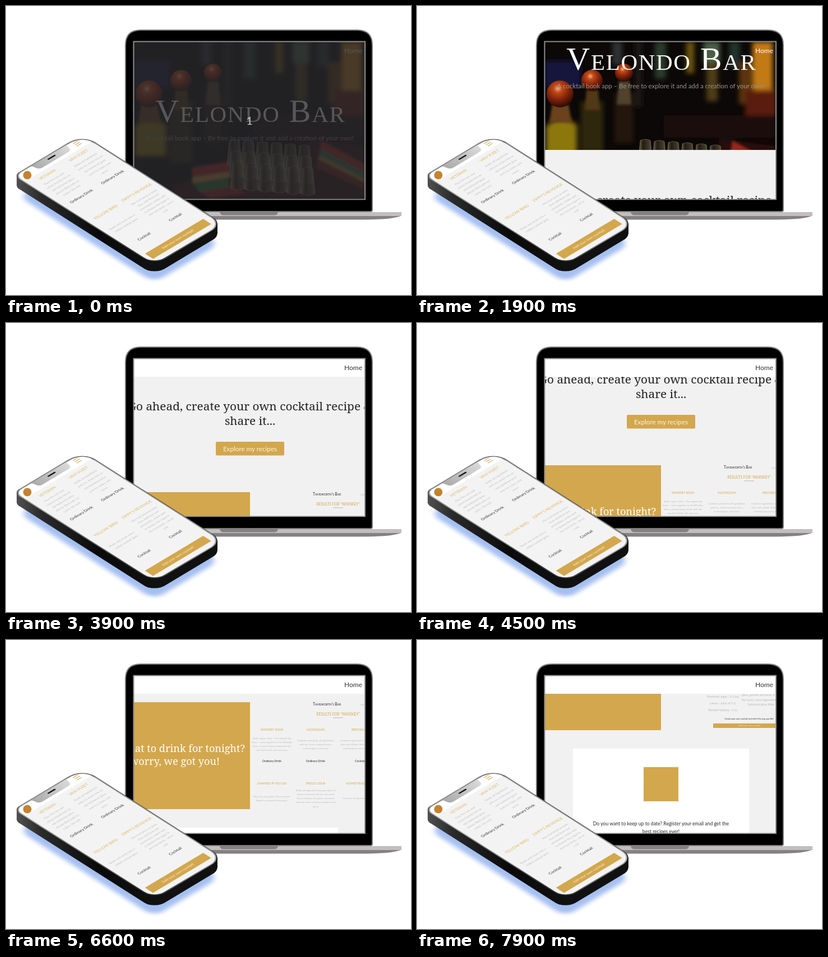
An HTML page that plays this animation: 722 px wide and 516 px high, repeating every 8 s.

```html
<!DOCTYPE html>
<html lang="en">
<head>
<meta charset="utf-8">
<title>Cocktail app mockup</title>
<style>
  html, body { margin: 0; width: 100%; height: 100%; overflow: hidden; background: #fff; }
  svg { display: block; }
  text { font-family: Lato, "Open Sans", sans-serif; text-anchor: middle; }
  .serif { font-family: "Noto Serif", serif; font-weight: 500; }
  .title { font: 58px "Liberation Serif", serif; font-variant: small-caps; letter-spacing: 1.7px; }
  .caps { font-variant: small-caps; }
  .left { text-anchor: start; }
  .right { text-anchor: end; }
</style>
</head>
<body>
<svg width="722" height="516" viewBox="0 0 722 516">
  <defs>
    <filter id="soft" x="-20%" y="-20%" width="140%" height="140%"><feGaussianBlur stdDeviation="4"/></filter>
    <filter id="blur" x="-20%" y="-20%" width="140%" height="140%"><feGaussianBlur stdDeviation="2"/></filter>
    <radialGradient id="ball" cx=".42" cy=".3" r=".75">
      <stop offset="0" stop-color="#f0b08a"/><stop offset=".2" stop-color="#c24a18"/>
      <stop offset=".55" stop-color="#82230a"/><stop offset="1" stop-color="#1c0804"/>
    </radialGradient>
    <linearGradient id="glass" x1="0" x2="1">
      <stop offset="0" stop-color="#a89c7c" stop-opacity=".7"/><stop offset=".35" stop-color="#2b2215" stop-opacity=".75"/>
      <stop offset=".7" stop-color="#5d5138" stop-opacity=".6"/><stop offset="1" stop-color="#978b6c" stop-opacity=".65"/>
    </linearGradient>
    <linearGradient id="frame" x1="0" x2="1" y1="1" y2="0">
      <stop offset="0" stop-color="#333"/><stop offset=".4" stop-color="#999"/><stop offset="1" stop-color="#8a8a8a"/>
    </linearGradient>
    <linearGradient id="side" x1="0" x2="0" y1="0" y2="1">
      <stop offset="0" stop-color="#555"/><stop offset=".2" stop-color="#2a2a2a"/>
      <stop offset=".6" stop-color="#0a0a0a"/><stop offset="1" stop-color="#111"/>
    </linearGradient>
    <linearGradient id="notch" x1="0" x2="1"><stop offset="0" stop-color="#a9a9a9"/><stop offset="1" stop-color="#dcdcdc"/></linearGradient>
  </defs>

  <!-- laptop -->
  <path d="M213 364V70Q213 43 240 43H626Q653 43 653 70V364Q653 367 650 367H216Q213 367 213 364Z" stroke="#7d7d7d" stroke-width="2"/>
  <path d="M160 374H705Q694 381 640 381.500H160Z" fill="#858182"/>
  <path d="M160 368H705V375H160Z" fill="#c2bebf"/>
  <path d="M381 368H485Q484 373.500 478 373.500H388Q382 373.500 381 368Z" fill="#858182"/>

  <svg x="228" y="64" width="412" height="282" viewBox="228 64 412 282">
    <g id="photo">
      <rect x="228" y="64" width="412" height="282" fill="#0b0807"/>
      <g filter="url(#soft)">
        <path d="M228 98H292V146H228Z" fill="#17133c"/>
        <path d="M348 64H366V105H348Z" fill="#2f3032"/>
        <path d="M388 64H402V180H388Z" fill="#1a1712"/>
        <path d="M424 64H444V130H424Z" fill="#2c3a2a"/>
        <path d="M480 64H494V120H480Z" fill="#6d5510"/>
        <path d="M511 64H540V102H511Z" fill="#4b6144"/>
        <path d="M516 100H536V170H516Z" fill="#4e3c12"/>
        <path d="M556 64H576V110H556Z" fill="#22332b"/>
        <path d="M598 64H634V150H598Z" fill="#c27a12"/>
        <path d="M574 100H600V175H574Z" fill="#5c350c"/>
        <path d="M585 150H640V200H585Z" fill="#5a1a0c"/>
        <path d="M440 195H640V235H440Z" fill="#1a0f08"/>
        <path d="M230 215Q255 190 285 212V268H230Z" fill="#8c770c"/>
        <path d="M292 170H332V280H292Z" fill="#2f250a"/>
        <path d="M352 155H386V245H352Z" fill="#24160c"/>
        <path d="M540 238L640 250V346H520Z" fill="#2b0f0b"/>
        <path d="M300 320L400 290L580 346H290Z" fill="#32100f"/>
      </g>
      <g filter="url(#blur)">
        <path d="M241 176H270L276 208H236Z" fill="#6b431a"/>
        <path d="M302 150H323L326 186H299Z" fill="#513714"/>
        <path d="M360 134H379L382 176H356Z" fill="#51432f"/>
        <path d="M332 288L398 278V296L332 306Z" fill="#a5201a"/>
        <path d="M332 306L398 296V306L332 316Z" fill="#c08a38"/>
        <path d="M332 316L398 306V322L345 332Z" fill="#276c32"/>
        <path d="M345 332L400 322L430 334L365 344Z" fill="#8c241d"/>
        <path d="M562 240L640 282V298L560 256Z" fill="#96261b"/>
        <path d="M560 256L640 298V308L558 266Z" fill="#23684a"/>
        <path d="M558 266L640 308V316L556 274Z" fill="#a06f28"/>
        <path d="M556 276L640 318V328L552 288Z" fill="#6b1a18"/>
      </g>
      <circle cx="255" cy="157" r="24" fill="url(#ball)"/>
      <circle cx="312" cy="133" r="19" fill="url(#ball)"/>
      <circle cx="369" cy="119" r="16" fill="url(#ball)"/>
      <g id="glasses"></g>
    </g>
    <g id="page"></g>
    <rect id="nav" x="228" y="64" width="412" height="32" fill="#fff"/>
    <text id="home" x="619" y="84" font-size="12">Home</text>
    <g id="veil">
      <rect x="228" y="64" width="412" height="282" fill="#28282c" opacity=".78"/>
      <text x="434" y="212" font-size="20" fill="#ccc">1</text>
    </g>
  </svg>
  <rect x="227.500" y="63.500" width="412.500" height="282" fill="none" stroke="#8e8e8e" stroke-width="2"/>
  <path d="M226 347.500H642" stroke="#000" stroke-width="2"/>

  <g id="phone"></g>
</svg>
<script>
const $ = id => document.getElementById(id);
const GOLD = '#d3a74d', DARK = '#2a2a2a', PALE = '#b9b9b9';

// y is the middle of the line
const text = (x, y, str, size, fill, cls = '') =>
  `<text x="${x}" y="${y + size * .35}" font-size="${size}" fill="${fill}" class="${cls}">${str}</text>`;
const lines = (x, y, pitch, rows, size, fill, cls) =>
  rows.split('|').map((row, i) => text(x, y + i * pitch, row, size, fill, cls)).join('');
const rect = (x, y, w, h, fill, more = '') =>
  `<rect x="${x}" y="${y}" width="${w}" height="${h}" fill="${fill}" ${more}/>`;
const shift = (y, body, id = '') => `<g id="${id}" transform="translate(0 ${y})">${body}</g>`;

let glasses = '';
for (let row = 0; row < 3; row++)
  for (let i = 0; i < 6; i++) {
    const x = 398 + i * 25 + row * 3, y = 240 + row * 20 + i * 2;
    glasses += `<path d="M${x} ${y}q9 -4 18 0l4 45q-13 7 -26 0z" fill="url(#glass)" stroke="#b5a988" stroke-width=".8" stroke-opacity=".5"/>`;
  }
$('glasses').innerHTML = glasses;

const results =
  text(572, 115, 'Tamsworth’s Bar', 6.6, DARK, 'caps') +
  text(632, 115, 'Home', 4.5, PALE, 'left') +
  text(592, 133, 'RESULTS FOR “WHISKEY”', 6.6, GOLD) +
  rect(583, 138.5, 18, .8, '#aaa') +
  text(474, 160, 'WHISKEY SOUR', 5.4, GOLD) +
  text(552, 160, 'ALGONQUIN', 5.4, GOLD) +
  text(616, 160, 'BROOKLYN', 5.4, GOLD, 'left') +
  lines(474, 175, 7.3, 'Spirit, sugar, citrus – the original big|three – come together in the Whiskey|Sour, a classic boozy, lemonade-like|mix that’s both safe and sexy', 4.4, PALE) +
  lines(552, 179, 7.3, 'Combine and shake all ingredients|with ice, strain contents into a|cocktail glass, and serve', 4.4, PALE) +
  lines(596, 179, 7.3, 'Combine ingredients in a|with well-chilled. Strain into|&#160;&#160;&#160;&#160;cocktail glass and serve', 4.4, PALE, 'left') +
  text(474, 216, 'Ordinary Drink', 5.2, DARK) +
  text(552, 216, 'Ordinary Drink', 5.2, DARK) +
  text(622, 216, 'Cocktail', 5.2, DARK, 'left') +
  text(474, 256, 'DAMNED IF YOU DO', 5.4, GOLD) +
  text(552, 256, 'FRISCO SOUR', 5.4, GOLD) +
  text(606, 256, 'HOMESTEAD', 5.4, GOLD, 'left') +
  lines(474, 279, 7.3, 'Pour into shot glass. Put in mouth.|Repeat as deemed necessary.', 4.4, PALE) +
  lines(552, 268, 7.3, 'Shake all ingredients (except slices of|lemon and lime) with ice and strain|into a whiskey sour glass. Decorate|with the slices of lemon and lime and|serve', 4.4, PALE) +
  text(600, 282, 'Combine all ingredients', 4.4, PALE, 'left');

const recipe =
  lines(545, 101, 12.2, 'Powdered sugar : 1/2 tsp|Lemon : Juice of 1/2|Blended whiskey : 2 oz', 5.2, PALE) +
  lines(579, 98, 8.7, 'glass, garnish and serve. If|the rocks’, serve ingredients|&#160;&#160;&#160;&#160;&#160;&#160;&#160;&#160;fashioned glass filled', 5.2, PALE, 'left') +
  text(592, 140.5, 'Create your own cocktail and edit it the way you like!', 3.8, DARK) +
  rect(528, 149, 112, 8, GOLD) +
  text(592, 153, 'Create your own cocktail', 3.6, '#f5e8cd');

$('page').innerHTML =
  '<text class="title" x="436" y="207" fill="#fff">Velondo Bar</text>' +
  text(435, 236, 'A cocktail book app – Be free to explore it and add a creation of your own!', 11.4, '#96928c') +
  rect(228, 350, 412, 760, '#f1f1f1') +
  lines(435, 440, 26, 'Go ahead, create your own cocktail recipe &amp;|share it...', 20.8, '#222', 'serif') +
  rect(374, 503, 122, 24.5, GOLD, 'rx="2"') +
  text(435, 515.5, 'Explore my recipes', 11.7, '#fbf3e2') +
  rect(228, 593, 207, 191, GOLD) +
  shift(482,
    text(426, 194, 'What to drink for tonight?', 18.1, '#fff', 'serif right') +
    text(381, 217, 'Don’t worry, we got you!', 18.1, '#fff', 'serif right')) +
  shift(482, results, 'results') +
  shift(623, recipe, 'recipe') +
  rect(278, 817, 314, 290, '#fff') +
  shift(623, rect(404, 227, 62, 61, GOLD) +
    lines(435, 328, 14, 'Do you want to keep up to date? Register your email and get the|best recipes ever!', 8.65, DARK));

// phone: a flat layout of 140 by 294 laid down by one matrix
const tilt = (dy, body, more = '') =>
  `<g transform="matrix(.857 -.514 .843 .538 16.3 ${303 + dy})" ${more}>${body}</g>`;
// the outline, grown by g; the corner at the far left is the tightest
const slab = (g, fill, more = '') =>
  `<path d="M${-g} 13A13 13 0 0 1 13 ${-g}H112A28 28 0 0 1 ${140 + g} 28V272A22 22 0 0 1 118 ${294 + g}H22A22 22 0 0 1 ${-g} 272Z" fill="${fill}" ${more}/>`;
let body = tilt(34, rect(1, 6, 136, 287, '#a5bff0', 'rx="20"'), 'filter="url(#soft)"');
for (let dy = 17; dy >= 0; dy--) body += tilt(dy, slab(2, 'url(#side)'));

const card = (x, y, name, first, pitch, about, kind, kindY) =>
  text(x, y, name, 7.4, '#dcb767') +
  lines(x, first, pitch, about, 5.3, '#bdbdbd') +
  text(x, kindY, kind, 7, '#333');

$('phone').innerHTML = body +
  tilt(0,
    slab(.5, '#f3f3f3', 'stroke="url(#frame)" stroke-width="2"') +
    '<path d="M1 20V13Q2 1 13 1H112Q136 1 139 20Z" fill="#fff"/>' +
    '<path d="M31 0H109Q105 1 105 6Q104 14 97 14H43Q36 14 35 6Q35 1 31 0Z" fill="url(#notch)"/>' +
    rect(62, 4.5, 16, 2.6, '#111', 'rx="1.300"') +
    [4, 8, 12].map(y => rect(116, y, 10, 1.2, GOLD)).join('') +
    card(36.5, 31, 'VETERAN', 45, 9.5, 'Pour the rum and|crème brandy into an|old-fashioned glass|almost filled with ice|cubes. Stir well.', 'Ordinary Drink', 103) +
    card(102, 30, 'VAN VLEET', 45, 10, 'Shake all ingredients|with ice, strain into an|old-fashioned glass|over ice cubes, and|serve', 'Ordinary Drink', 102) +
    card(36, 155, 'YELLOW BIRD', 189, 9.5, 'Shake and strain into a|chilled cocktail glass', 'Cocktail', 236) +
    card(102, 153, 'ZIPPY’S REVENGE', 169, 9, 'Mix fruit drink to taste|then add Rum and|ammaretto, shake well|to disolve the sugar in|the fruit drink... serve|cold', 'Cocktail', 235) +
    rect(8, 266.5, 121, 17, GOLD) +
    text(68, 275, 'Add your own cocktail!', 6.5, '#fbf0d8')) +
  '<circle cx="38" cy="302" r="7.5" fill="#c5832f"/>';

// time and scroll distance, moving in 100 ms steps
const KEYS = [[0, 0], [1200, 0], [1300, 4], [1400, 18], [1500, 18], [2400, 187], [2500, 187],
  [2600, 204], [2800, 229], [3000, 241], [3500, 241], [3700, 262], [3900, 291], [4000, 291],
  [4900, 378], [5100, 396], [5400, 434], [5500, 434], [5800, 476], [5900, 476], [6000, 479],
  [6500, 479], [6600, 482], [7400, 572], [7900, 623], [8000, 623]];

function scrollAt(t) {
  const i = KEYS.findIndex(k => k[0] > t);
  const [t0, s0] = KEYS[i - 1], [t1, s1] = KEYS[i];
  return s0 + (s1 - s0) * (t - t0) / (t1 - t0);
}

const show = (id, on) => $(id).style.display = on ? '' : 'none';

function draw(now) {
  const t = Math.floor(now % 8000 / 100) * 100;
  const s = Math.round(scrollAt(t));
  $('page').setAttribute('transform', `translate(0 ${-s})`);
  const solid = s > 254;
  show('nav', solid);
  $('home').setAttribute('fill', solid ? '#333' : '#fff');
  show('veil', t < 100);
  show('results', t < 7000);
  show('recipe', t >= 7000);
}

const start = performance.now();
function tick() {
  draw(performance.now() - start);
  requestAnimationFrame(tick);
}
tick();
</script>
</body>
</html>
```
